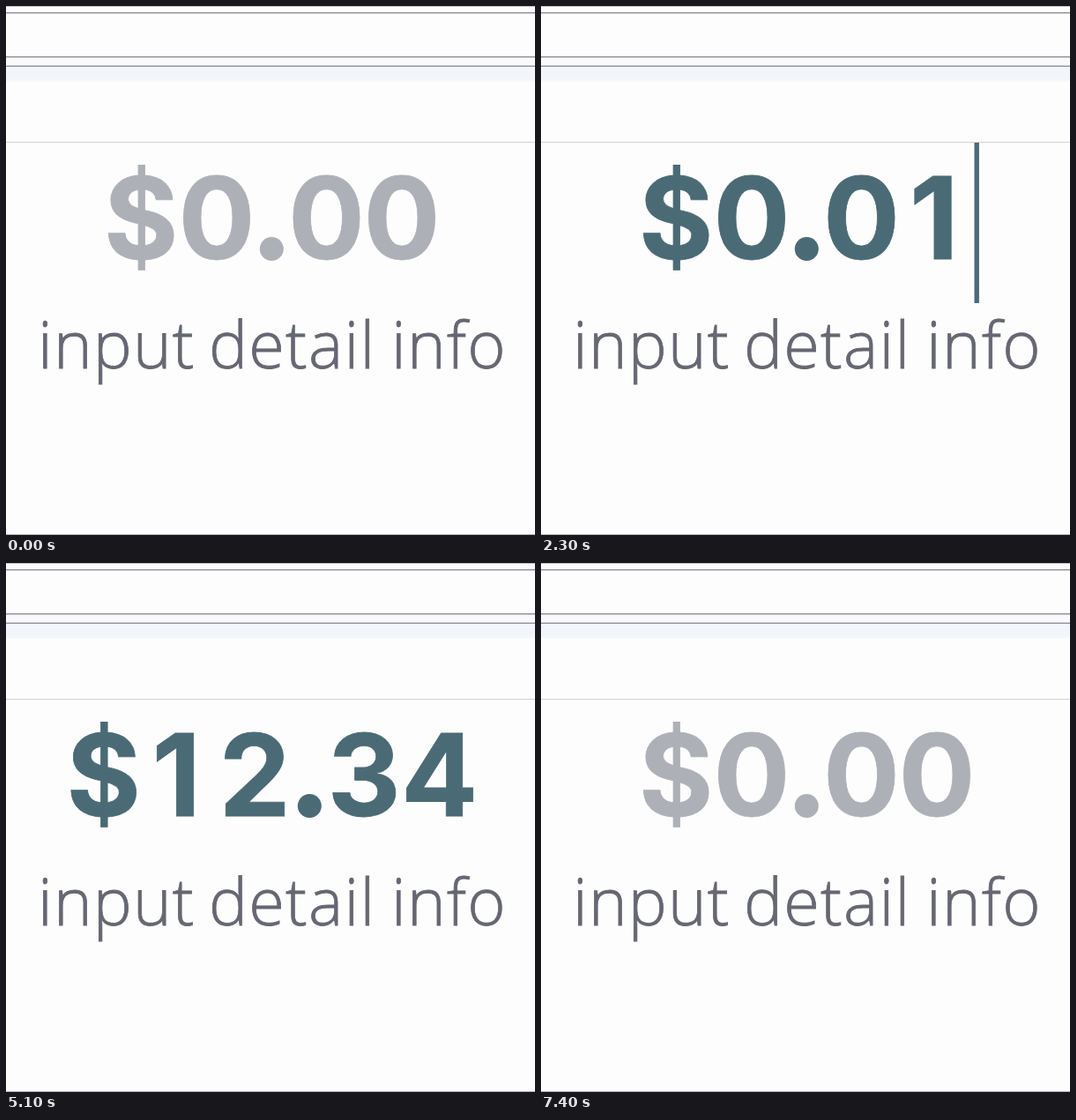
An HTML page with a canvas that plays this animation: 600 px wide and 600 px high, repeating every 7900 ms.

```html
<!DOCTYPE html>
<html lang="en">
<head>
<meta charset="utf-8">
<title>Amount input</title>
<style>
  html, body { margin: 0; height: 100%; overflow: hidden; background: #fefdfe; }
  canvas { display: block; }
</style>
</head>
<body>
<canvas id="stage" width="600" height="600"></canvas>
<script>
const ctx = document.getElementById('stage').getContext('2d');
const LOOP = 7900, TEAL = '#4a6b75', GREY = '#aeb0b8';

// [start ms, amount, caret x or 0 when hidden]
const states = [
  [0, '$0.00', 0], [1200, '$0.00', 301], [1700, '$0.00', 0], [2200, '$0.00', 301],
  [2300, '$0.01', 491], [2800, '$0.12', 0],
  [3200, '$1.23', 491], [3400, '$1.23', 0],
  [3800, '$12.34', 533], [4000, '$12.34', 0], [4500, '$12.34', 533], [5100, '$12.34', 0],
  [5600, '$1.23', 491], [5700, '$1.23', 0],
  [6000, '$0.12', 491], [6200, '$0.12', 0],
  [6500, '$0.01', 491], [6800, '$0.01', 0],
  [7000, '$0.00', 301], [7400, '$0.00', 0]
];

function bar(y, h, color) {
  ctx.fillStyle = color;
  ctx.fillRect(0, y, 600, h);
}

function drawPage() {
  bar(0, 600, '#fefdfe');
  bar(0, 1, '#c4c3ca');
  bar(7, 1.5, '#96939d');
  bar(57, 1.5, '#96939d');
  bar(59, 8, '#f9f9fc');
  bar(69, 14, '#f2f6fa');
  bar(83, 3, '#f6f8fb');
  bar(67.5, 1.5, '#96939d');
  bar(154, 1, '#d2d2d8');
  bar(599, 1, '#b4b3ba');
}

function inkText(text, x, y) {
  ctx.fillText(text, x, y);
  ctx.strokeText(text, x, y);
}

function drawLabel() {
  ctx.font = '300 74px "Open Sans", sans-serif';
  ctx.letterSpacing = '1.2px';
  ctx.fillStyle = ctx.strokeStyle = '#666772';
  ctx.lineWidth = 0.8;
  for (const [word, left] of [['input', 42], ['detail', 234], ['info', 443]])
    inkText(word, left + ctx.measureText(word).actualBoundingBoxLeft, 411);
  ctx.letterSpacing = '0px';
}

function drawAmount(text) {
  ctx.font = '700 129px Inter, sans-serif';
  ctx.fillStyle = ctx.strokeStyle = text === '$0.00' ? GREY : TEAL;
  ctx.lineWidth = 0.8;
  let x = 153.5 - (text.length - 5) * 42.5;
  [...text].forEach((ch, i) => {
    if (ch === '.') {
      ctx.beginPath();
      ctx.arc(x, 275.5, 13.5, 0, 7);
      ctx.fill();
    } else {
      const m = ctx.measureText(ch);
      const center = (m.actualBoundingBoxRight - m.actualBoundingBoxLeft) / 2;
      inkText(ch, x - center - (ch === '1' ? 4.5 : 0), 287.3);
    }
    x += ch === '.' || text[i + 1] === '.' ? 62.3 : 85.5;
  });
}

function drawCaret(x) {
  if (!x) return;
  ctx.fillStyle = TEAL;
  ctx.fillRect(x + 0.5, 155, 5.4, 182);
}

function drawPointer(t) {
  if (t < 500 || t >= 1300) return;
  const p = Math.min(1, Math.max(0, (t - 600) / 500));
  const e = p * p * (3 - 2 * p);
  const x = 328 - 126 * e, y = 509 - 264 * e;
  ctx.save();
  ctx.translate(x, y);
  ctx.lineJoin = 'round';
  ctx.lineWidth = 2;
  if (y < 338) {
    ctx.strokeStyle = '#222';
    ctx.stroke(new Path2D('M-6-15Q0-15 0-11Q0-15 6-15M0-11V11M-6 15Q0 15 0 11Q0 15 6 15'));
  } else {
    const arrow = new Path2D('M0 0V25L6 19.5L10.5 29.5L14.5 28L10.5 18H19Z');
    ctx.fillStyle = '#111';
    ctx.strokeStyle = '#fff';
    ctx.fill(arrow);
    ctx.stroke(arrow);
  }
  ctx.restore();
}

const start = performance.now();

function draw() {
  const t = Math.floor((performance.now() - start) % LOOP / 100) * 100;
  const [, amount, caret] = states.findLast(s => s[0] <= t);
  drawPage();
  drawLabel();
  drawAmount(amount);
  drawCaret(caret);
  drawPointer(t);
  requestAnimationFrame(draw);
}
draw();
</script>
</body>
</html>
```
